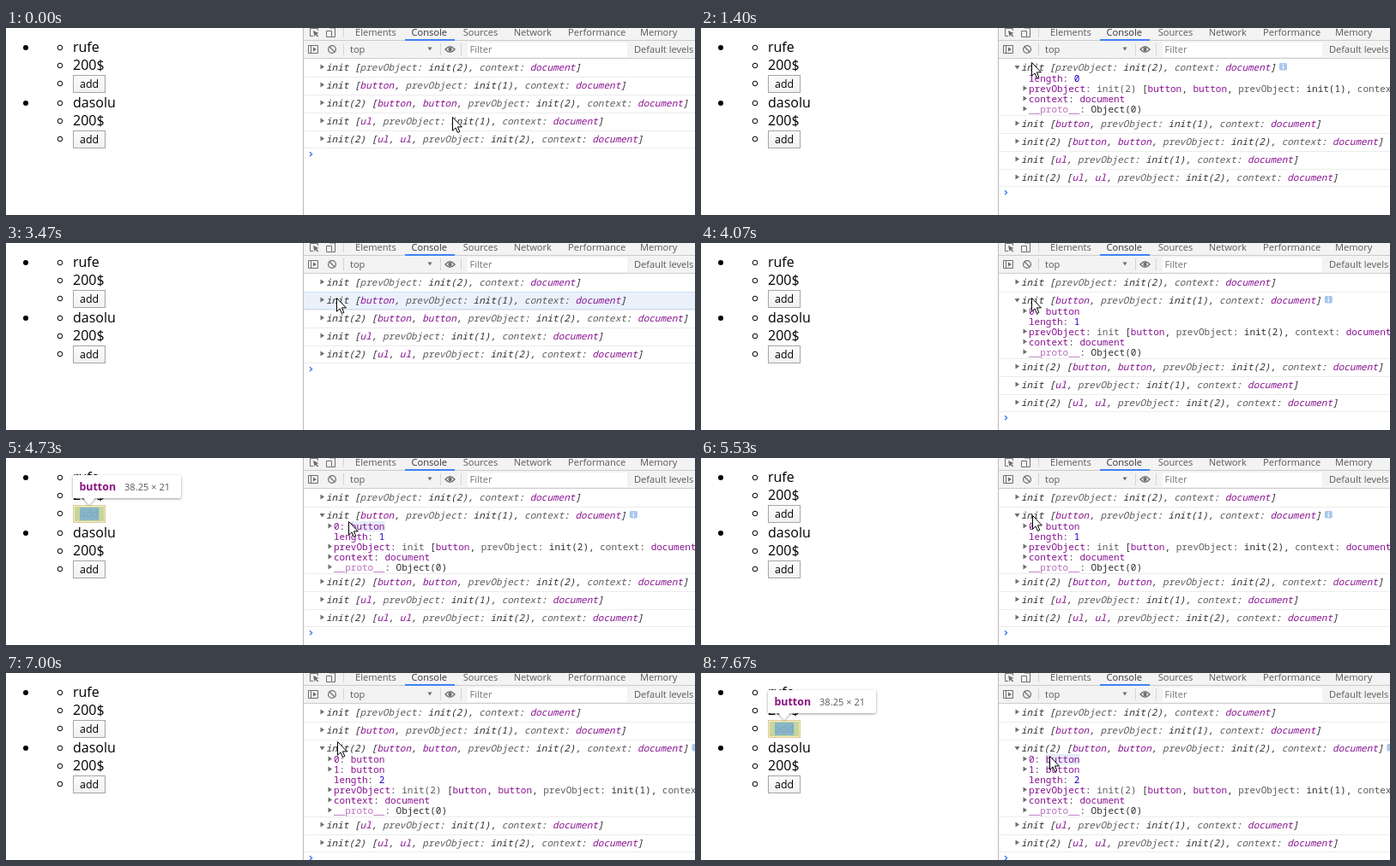
An HTML page that plays this animation: 803 px wide and 219 px high, repeating every 8000 ms.

```html
<!DOCTYPE html>
<html lang="en">
<head>
<meta charset="utf-8">
<title>Console inspection</title>
<style>
  html, body { margin: 0; width: 100%; height: 100%; overflow: hidden; background: #fff; }
  svg { display: block; }
  text { white-space: pre; }
  .page { font: 16px "Open Sans", sans-serif; fill: #000; }
  .btn { font: 12.4px "Open Sans", sans-serif; fill: #000; }
  .ui { font: 11.1px "Open Sans", sans-serif; fill: #5a5a5a; }
  .mono { font: 11px "Noto Sans Mono", monospace; fill: #303030; }
  .head { font-style: italic; }
  .icon { fill: none; stroke: #6e6e6e; }
</style>
</head>
<body>
<svg id="stage" width="803" height="219" viewBox="0 0 803 219">
  <defs>
    <linearGradient id="face" x1="0" y1="0" x2="0" y2="1">
      <stop offset="0" stop-color="#fbfbfb"/><stop offset="1" stop-color="#f1f1f1"/>
    </linearGradient>
    <filter id="shadow" x="-10%" y="-30%" width="120%" height="170%">
      <feDropShadow dx="0" dy="1" stdDeviation="1.8" flood-color="#000" flood-opacity=".4"/>
    </filter>
  </defs>
  <rect width="803" height="219" fill="#fff"/>
  <g id="page"></g>
  <g id="tip">
    <rect x="78" y="55" width="38.25" height="21" fill="#ffe599" fill-opacity=".6"/>
    <rect x="80" y="57" width="34.25" height="17" fill="#93c47d" fill-opacity=".5"/>
    <rect x="86" y="58" width="22.25" height="15" fill="#6fa8dc" fill-opacity=".7"/>
    <path filter="url(#shadow)" fill="#fff" d="M80 20H202a2 2 0 0 1 2 2V45a2 2 0 0 1-2 2H104L97 54.5 90 47H80a2 2 0 0 1-2-2V22a2 2 0 0 1 2-2Z"/>
    <text class="ui" x="85.5" y="38" style="font-size:12.4px;font-weight:700;fill:#881280">button</text>
    <text class="ui" x="138" y="38">38.25 × 21</text>
  </g>
  <g id="rows"></g>
  <path id="prompt" d="M354 145.3l2.6 2.5-2.6 2.5" fill="none" stroke="#367cf1" stroke-width="1.3"/>
  <g id="tools">
    <rect x="347" width="456" height="35" fill="#f3f3f3"/>
    <path d="M346 14.5H803M346 35.5H803" stroke="#ccc"/>
    <path d="M346.5 0V219" stroke="#bbb"/>
    <path d="M393.5 0V11M393.5 18V32M506.5 18V32M530.5 18V32" stroke="#d4d4d4"/>
    <rect x="465" y="13" width="58" height="2" fill="#3e82f7"/>
    <path class="icon" d="M358 9.5H354.5V.5H363.5V3"/>
    <path d="M358 3l6.5 3-2.6.9 2.4 2.6-1.1 1-2.4-2.5-1.3 2.2Z" fill="#6e6e6e"/>
    <path class="icon" d="M377 0H383.5V10.5H380M373.5 3.5H379.5V10.5H373.5Z"/>
    <path class="icon" d="M352.5 20.5H363.5V29.5H352.5ZM355.5 20.5V29.5"/>
    <path d="M358 22.5l4 2.5-4 2.5Z" fill="#6e6e6e"/>
    <circle class="icon" cx="380" cy="25" r="4.4" stroke-width="1.3"/>
    <path class="icon" d="M377 22l6 6" stroke-width="1.3"/>
    <path d="M491.5 22.5H496.5L494 26.5Z" fill="#6e6e6e"/>
    <path class="icon" d="M512 25Q517.5 18.5 523 25Q517.5 31.5 512 25Z" stroke-width="1.4"/>
    <circle cx="517.5" cy="25" r="2.2" fill="#6e6e6e"/>
    <rect x="538" y="17" width="186" height="17" fill="#fff"/>
  </g>
  <g id="busy" fill="none" stroke-width="3">
    <circle r="6" stroke="#3f8fd8"/>
    <path d="M0-6A6 6 0 0 1 6 0" stroke="#8fd0f5"/>
  </g>
  <path id="cursor" d="M.5.5V16.2L4 12.9 6.4 18.5 8.8 17.5 6.4 11.9H11.4Z" fill="#fff" stroke="#000" stroke-linejoin="round"/>
</svg>
<script>
const NS = "http://www.w3.org/2000/svg";
const $ = id => document.getElementById(id);
const LOOP = 8000, TICK = 1000 / 15, CHAR = 6.6;
const PURPLE = "#881391", GREY = "#5c5c5c", DARK = "#303030", BLUE = "#1c00cf";

function add(parent, tag, attrs = {}, text = "") {
  const el = document.createElementNS(NS, tag);
  for (const k in attrs) el.setAttribute(k, attrs[k]);
  el.textContent = text;
  return parent.appendChild(el);
}
const label = (parent, cls, x, y, text) => add(parent, "text", { class: cls, x, y }, text);
const show = (el, on) => el.setAttribute("visibility", on ? "visible" : "hidden");
const move = (el, x, y) => el.setAttribute("transform", `translate(${x} ${y})`);

// Left page: two product lists
const page = $("page");
[["rufe", 0], ["dasolu", 65]].forEach(([name, y]) => {
  add(page, "circle", { cx: 23, cy: y + 23, r: 3 });
  [0, 21, 42].forEach(d =>
    add(page, "circle", { cx: 63, cy: y + 23 + d, r: 2.8, fill: "none", stroke: "#000" }));
  label(page, "page", 78, y + 28, name);
  label(page, "page", 78, y + 49, "200$");
  add(page, "rect", { x: 78.5, y: y + 55.5, width: 37, height: 20, fill: "url(#face)", stroke: "#a5a5a5" });
  label(page, "btn", 86, y + 70, "add");
});

// Toolbar labels
[["Elements", 407], ["Console", 472.5], ["Sources", 532.7], ["Network", 591.7], ["Performance", 655], ["Memory", 739]]
  .forEach(([name, x]) => {
    const el = label($("tools"), "ui", x, 9, name);
    if (name === "Console") el.style.fill = "#333";
  });
[["top", 401], ["Filter", 540.5], ["Default levels", 732]].forEach(([s, x]) => {
  const el = label($("tools"), "ui", x, 29.3, s);
  if (s === "Filter") el.style.fill = "#757575";
});

// Console output
function paint(el, text) {
  text.split(/(button|\bul\b|document|prevObject|context)/).forEach(part => {
    const fill = /^(button|ul|document)$/.test(part) ? PURPLE : /^(prevObject|context)$/.test(part) ? GREY : DARK;
    add(el, "tspan", { fill }, part);
  });
}
function child(parent, line, y) {
  const [, key, value] = line.match(/^(\w+): (.*)$/);
  const el = label(parent, "mono", 382, y, "");
  add(el, "tspan", { fill: key === "__proto__" ? "#b871bd" : PURPLE }, key);
  add(el, "tspan", {}, ": ");
  if (key === "length") { add(el, "tspan", { fill: BLUE }, value); return; }
  add(parent, "path", { d: `M375.5 ${y - 7.5}l4.5 3-4.5 3Z`, fill: "#6e6e6e" });
  const lead = value.match(/^init\S*/);
  if (lead) add(el, "tspan", { fill: GREY }, lead[0]);
  paint(el, lead ? value.slice(lead[0].length) : value);
}

const tail = n => `prevObject: init(${n}), context: document]`;
const two = "init(2) [button, button, ";
const common = ["context: document", "__proto__: Object(0)"];
const rows = [
  ["init [" + tail(2), ["length: 0", "prevObject: " + two + tail(1), ...common]],
  ["init [button, " + tail(1), ["0: button", "length: 1", "prevObject: init [button, " + tail(2), ...common]],
  [two + tail(2), ["0: button", "1: button", "length: 2", "prevObject: " + two + tail(1), ...common]],
  ["init [ul, " + tail(1), []],
  ["init(2) [ul, ul, " + tail(2), []]
].map(([text, lines], i, all) => {
  const g = add($("rows"), "g");
  if (i > 0) add(g, "path", { d: "M347 .5H803", stroke: "#ececec" });
  if (i === all.length - 1) add(g, "path", { d: "M347 20.5H803", stroke: "#ececec" });
  const focus = add(g, "rect", { x: 346.5, y: .5, width: 460, height: 20, fill: "#eaf1fb", stroke: "#cddff5" });
  const closed = add(g, "path", { d: "M366.5 6.5l4.5 3-4.5 3Z", fill: "#6e6e6e" });
  paint(label(g, "mono head", 373, 14, ""), text);
  const open = add(g, "g");
  add(open, "path", { d: "M365.5 8H371.5L368.5 12.5Z", fill: "#6e6e6e" });
  const end = 373 + text.length * CHAR + 4;
  add(open, "rect", { x: end, y: 5, width: 9, height: 8.5, rx: 1.5, fill: "#a9c7ee" });
  add(open, "path", { d: `M${end + 4.5} 6.3v1.3m0 1v3.4`, stroke: "#fff", "stroke-width": 1.4 });
  const hover = add(open, "rect", { x: 401.5, y: 17, width: 40, height: 12, fill: "#e6eaf8" });
  lines.forEach((line, n) => child(open, line, 27 + 12 * n));
  return { g, focus, closed, open, hover, grow: 12 * lines.length - 3 };
});

// Pointer moves: start, end, target x, target y
const moves = [
  [70, 70, 505, 99], [330, 470, 385, 40], [2270, 2330, 385, 58], [3330, 3470, 385, 64],
  [4470, 4870, 405, 78], [5400, 5530, 386, 67], [6330, 6400, 386, 80], [7200, 7670, 406, 97]
];
function pointer(t) {
  let x = 520, y = 104;
  for (const [a, b, tx, ty] of moves) {
    if (t < a) break;
    const steps = Math.round((b - a) / TICK) + 1;
    const k = Math.min(1, (Math.floor((t - a + 7) / TICK) + 1) / steps);
    x += (tx - x) * k;
    y += (ty - y) * k;
  }
  return [Math.round(x), Math.round(y)];
}

const within = (t, a, b) => t >= a && t < b;

function draw(t) {
  const opened = within(t, 1400, 2000) ? 0 : within(t, 4070, 6070) ? 1 : t >= 7000 ? 2 : -1;
  const focused = within(t, 2930, 3930);
  const hovered = within(t, 4730, 5465) || t >= 7530;
  let y = 36;
  rows.forEach((r, i) => {
    const isOpen = i === opened;
    move(r.g, 0, y);
    show(r.closed, !isOpen);
    show(r.open, isOpen);
    show(r.hover, isOpen && hovered);
    show(r.focus, i === 1 && focused);
    y += 21 + (isOpen ? r.grow : 0);
  });
  move($("prompt"), 0, y - 141);
  show($("tip"), hovered);
  const [cx, cy] = pointer(t);
  move($("cursor"), cx, cy);
  show($("busy"), within(t, 2400, 2600));
  move($("busy"), cx + 14.5, cy + .5);
}

const begin = performance.now();
function loop() {
  draw((performance.now() - begin) % LOOP);
  requestAnimationFrame(loop);
}
draw(0);
requestAnimationFrame(loop);
</script>
</body>
</html>
```
